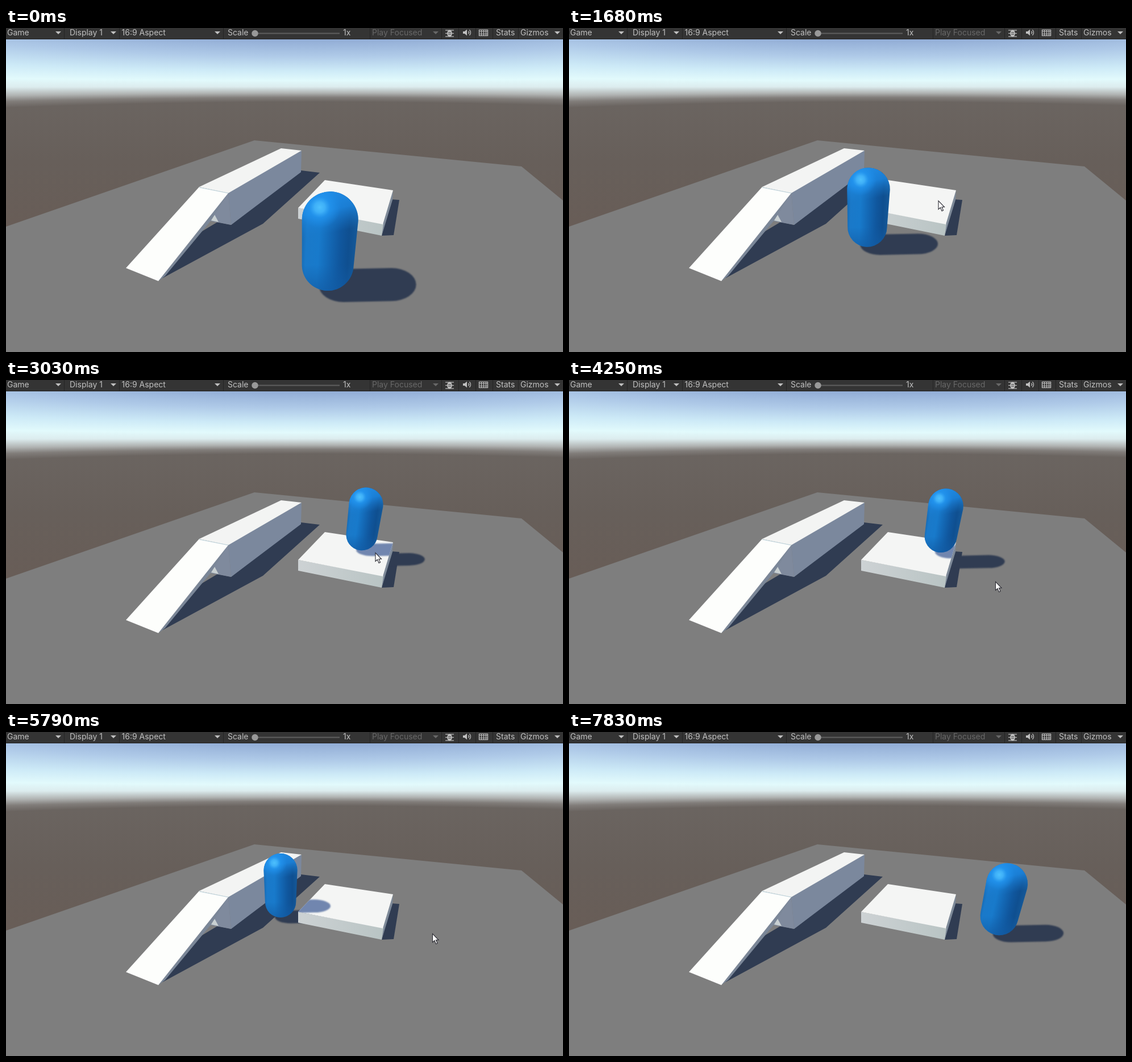
Recreate the animation shown at these times as an HTML page with a canvas. Size 980 by 571 pixels, loop 8330 ms.

```html
<!DOCTYPE html>
<html lang="en">
<head>
<meta charset="utf-8">
<title>Capsule walk</title>
<style>
html, body { margin: 0; width: 100%; height: 100%; overflow: hidden; background: #7e7e7e; }
canvas { display: block; }
</style>
</head>
<body>
<canvas id="stage" width="980" height="571"></canvas>
<script>
const W = 980, H = 571, LOOP = 8330;
const SHADOW = '#303c52';
const stage = document.getElementById('stage').getContext('2d');
let c = stage;

const clamp = (v, lo = 0, hi = 1) => Math.min(hi, Math.max(lo, v));
const smooth = u => u * u * (3 - 2 * u);

// Corners of each walk on the floor: [sideways, depth] in world units
const trips = [
  { from: 1000, to: 3400, path: [[.94, 5.46], [.59, 6.83], [.27, 7.97], [.57, 8.85],
    [1.73, 8.88], [3.02, 8.47]] },
  { from: 4530, to: 7540, path: [[3.02, 8.47], [1.73, 8.88], [.36, 9.12], [-.05, 8.52],
    [-.12, 8.1], [.66, 7.63], [2.52, 7.07], [2.99, 6.92], [4.3, 7.51]] }
];
const RAMP = 440; // ms to reach or lose full speed

// Pointer moves along Bezier curves
const moves = [
  { from: 130, to: 940, curve: [[667, 499], [655, 310], [625, 250], [649.5, 304]] },
  { from: 3400, to: 3970, curve: [[649.5, 304], [605, 450], [720, 490], [743, 369]] },
  { from: 4140, to: 4250, curve: [[743, 369], [743, 369], [750, 355], [750, 355]] },
  { from: 7400, to: 7830, curve: [[750, 355], [748, 370], [738, 500], [738, 524]] }
];

const latest = (list, t) => list.filter(m => m.from <= t).pop() || list[0];
const gapOf = (a, b) => Math.hypot(b[0] - a[0], b[1] - a[1]);
const mix = (a, b, u) => a.map((v, i) => v + (b[i] - v) * u);

function along(path, d) {
  let i = 0;
  while (i < path.length - 2 && d > gapOf(path[i], path[i + 1])) {
    d -= gapOf(path[i], path[i + 1]);
    i++;
  }
  return mix(path[i], path[i + 1], clamp(d / gapOf(path[i], path[i + 1])));
}

// Speeds up, cruises and brakes; corners are rounded
function walkerAt(t) {
  const { from, to, path } = latest(trips, t);
  const total = path.slice(1).reduce((sum, p, i) => sum + gapOf(path[i], p), 0);
  const span = to - from, s = clamp(t - from, 0, span);
  const covered = s < RAMP ? s * s / RAMP / 2 :
    s > span - RAMP ? span - RAMP - (span - s) ** 2 / RAMP / 2 : s - RAMP / 2;
  const d = total * covered / (span - RAMP);
  const round = clamp(Math.min(d, total - d), 0, .25);
  return mix(along(path, d - round), along(path, d + round), .5);
}

function pointerAt(t) {
  const { from, to, curve } = latest(moves, t);
  const u = smooth(clamp((t - from) / (to - from)));
  let points = curve;
  while (points.length > 1)
    points = points.slice(1).map((p, i) => mix(points[i], p, u));
  return points[0];
}

// Screen place of a capsule two units tall, and its height above the floor
function project([side, depth]) {
  const h = 954 / depth, x = 484 + side * h / 2, floor = 79 + h / .455;
  const up = floor < 335 ? smooth(clamp((x - 510) / 45)) : 0;
  return { x, y: floor - .2 * h * up, h, up, lean: .055 * side };
}

function trace(points) {
  c.beginPath();
  for (let i = 0; i < points.length; i += 2) c.lineTo(points[i], points[i + 1]);
  c.closePath();
}

function poly(fill, ...points) {
  trace(points);
  c.fillStyle = fill;
  c.fill();
}

function blend(g, ...stops) {
  for (const [at, color] of stops) g.addColorStop(at, color);
  return g;
}

const linear = (x0, y0, x1, y1, ...stops) =>
  blend(c.createLinearGradient(x0, y0, x1, y1), ...stops);

function line(color, width, ...p) {
  c.beginPath();
  for (let i = 0; i < p.length; i += 4) {
    c.moveTo(p[i], p[i + 1]);
    c.lineTo(p[i + 2], p[i + 3]);
  }
  c.strokeStyle = color;
  c.lineWidth = width;
  c.stroke();
}

function drawBackdrop() {
  c.fillStyle = linear(0, 120, 0, 350, [0, '#6b6561'], [.5, '#675f5a'], [1, '#685d57']);
  c.fillRect(0, 0, W, H);
  // Sky strips: the horizon bends down and the blue thins out to the sides
  for (let x = 0; x < W; x += 4) {
    const bend = ((x - 540) / 540) ** 2, end = 130 + 10 * bend;
    c.fillStyle = linear(0, 20 - 30 * bend, 0, end,
      [0, '#91acd5'], [.27, '#afcae8'], [.5, '#cdeaf7'], [.66, '#e2fafc'],
      [.76, '#dcecee'], [.86, '#b0b3b2'], [.93, '#817d7a'], [1, '#6b6561']);
    c.fillRect(x, 0, 4, end);
  }
  poly('#7e7e7e', 437, 198, 907, 244, 980, 304, 980, 571, 0, 571, 0, 350);
  poly(SHADOW, 396, 347, 519, 251, 552, 255, 452, 345, 275, 441, 342, 360, 372, 342);
  poly(SHADOW, 678, 302, 692, 303, 682, 365, 661, 366);
}

const platformTop = [561, 268, 681, 286, 663, 346, 514, 317];

function drawBlocks() {
  poly('#7f8a9d', 391, 290, 396, 347, 359, 340, 350, 310);
  poly('#c9d0d2', 367, 329, 374, 342, 360, 339);
  poly('#7b889d', 391, 290, 520, 216, 519, 254, 396, 347);
  poly('#f3f4f3', 340, 280, 484, 212, 520, 216, 391, 291);
  poly('#7b8798', 391, 291, 268, 446, 280, 437, 361, 339);
  poly('#fdfefc', 340, 280, 391, 291, 268, 446, 211, 423);
  line('#b9d0da', 1, 340, 281, 391, 291);
  poly('#7d8998', 681, 286, 663, 345, 661, 366, 680, 303);
  poly(linear(514, 0, 663, 0, [0, '#cdd2d4'], [1, '#b9c4c4']),
    514, 317, 664, 345, 661, 366, 514, 336);
  poly('#f4f5f4', ...platformTop);
}

function drawToolbar() {
  const ink = '#c0c0c0', dim = '#686868', bar = '#343434';
  c.fillStyle = bar;
  c.fillRect(0, 0, W, 20);
  c.fillStyle = '#242424';
  c.fillRect(0, 19, W, 1);
  for (const x of [102, 199, 382, 640, 766, 796, 826, 856, 901]) c.fillRect(x, 0, 1, 19);

  c.font = '14px Inter, Roboto, sans-serif';
  const label = (text, x, color = ink) => {
    c.fillStyle = color;
    c.fillText(text, x, 13);
  };
  const caret = (x, color = ink) => poly(color, x - 5, 6, x + 5, 6, x, 11);
  label('Game', 2);
  label('Display 1', 112);
  label('16:9 Aspect', 203.5);
  label('Scale', 390);
  label('1x', 593);
  label('Play Focused', 644, dim);
  label('Stats', 862);
  label('Gizmos', 905);
  for (const x of [92, 189, 372, 970]) caret(x);
  caret(756, dim);

  line('#5e5e5e', 2, 438, 9.5, 587, 9.5);
  c.beginPath();
  c.arc(438, 9.5, 5.7, 0, 7);
  c.fillStyle = '#999';
  c.fill();

  // Bug
  c.beginPath();
  c.ellipse(780.5, 9.5, 4.3, 6, 0, 0, 7);
  c.fillStyle = ink;
  c.fill();
  for (const y of [4, 9.5, 15]) line(ink, 1.2, 773, y, 788, y);
  line(bar, 1, 778, 8, 783, 8, 778, 11, 783, 11);
  // Speaker
  poly(ink, 804, 6, 807, 6, 811, 2.5, 811, 13.5, 807, 10, 804, 10);
  c.strokeStyle = ink;
  c.lineWidth = 1.3;
  for (const r of [3, 6]) {
    c.beginPath();
    c.arc(811.5, 8, r, -.9, .9);
    c.stroke();
  }
  // Keyboard
  c.strokeRect(832.5, 3.5, 15, 10);
  for (const y of [6.5, 10.5]) line(ink, 1, 832, y, 848, y);
  for (const x of [836.5, 840.5, 844.5]) line(ink, 1, x, 3, x, 14);
}

function layer(...draws) {
  const canvas = document.createElement('canvas');
  canvas.width = W;
  canvas.height = H;
  c = canvas.getContext('2d');
  for (const draw of draws) draw();
  c = stage;
  return canvas;
}

// Shadow cast on a surface "drop" capsule heights below the feet scale
function drawShadow({ x, y, h }, drop, fill) {
  const rx = .25 * h, ry = h * (.00107 * h - .02), quarter = Math.PI / 2;
  const left = x + .11 * h * drop;
  const mid = y + .16 * h * drop - h * (.0007 * h - .06);
  c.beginPath();
  c.ellipse(left + .16 * h, mid + .01 * h, rx, ry, 0, quarter, 3 * quarter);
  c.ellipse(left + .64 * h, mid, rx, ry, 0, -quarter, quarter);
  c.closePath();
  c.filter = 'blur(.8px)';
  c.fillStyle = fill;
  c.fill();
  c.filter = 'none';
}

function drawCapsule({ x, y, h, lean }) {
  const top = h * (.232 + .00027 * h + .00009 * Math.max(0, x - 520));
  const low = top * .92, gap = h - top - low, a = Math.atan(lean);
  const tx = x + lean * gap, ty = y - h + top;
  const mx = (x + tx) / 2, my = (y - low + ty) / 2;
  const ex = top * Math.cos(a), ey = top * Math.sin(a);
  const paint = gradient => {
    c.fillStyle = gradient;
    c.fill();
  };
  c.beginPath();
  c.arc(tx, ty, top, Math.PI + a, a);
  c.arc(x, y - low, low, a, Math.PI + a);
  c.closePath();
  paint(linear(mx - ex, my - ey, mx + ex, my + ey, [0, '#1768af'], [.1, '#1a79c9'],
    [.32, '#187acb'], [.5, '#1469b6'], [.7, '#10579e'], [.85, '#0f4f90'], [1, '#155999']));
  paint(linear(tx - top * .15, ty - top, tx + top * .15, ty + top * .45,
    [0, 'rgba(32,140,230,.95)'], [.45, 'rgba(30,140,232,.75)'], [1, 'rgba(26,125,210,0)']));
  paint(linear(0, y - low, 0, y, [0, 'rgba(18,92,165,0)'], [1, 'rgba(18,92,165,.7)']));
  const gx = tx - top * .37, gy = ty - top * .44;
  paint(blend(c.createRadialGradient(gx, gy, 0, gx, gy, top * .75), [0, '#4dc0fd'],
    [.25, 'rgba(66,180,250,.9)'], [.5, 'rgba(36,152,242,.6)'], [1, 'rgba(30,145,238,0)']));
}

function drawPointer([x, y]) {
  c.save();
  c.translate(x + .5, y + .5);
  poly('#fff', 0, 0, 0, 15, 3.5, 12, 6, 18, 8.5, 17, 6, 11, 10.5, 11);
  c.strokeStyle = '#2b2b33';
  c.lineWidth = 1.1;
  c.stroke();
  c.restore();
}

const backdrop = layer(drawBackdrop);
const scenery = layer(drawBlocks, drawToolbar);

function render(t) {
  const capsule = project(walkerAt(t));
  c.drawImage(backdrop, 0, 0);
  drawShadow(capsule, capsule.up, SHADOW);
  c.drawImage(scenery, 0, 0);
  c.save();
  trace(platformTop);
  c.clip();
  drawShadow(capsule, capsule.up - 1, '#7186af');
  c.restore();
  drawCapsule(capsule);
  if (t >= 130 && t < 7830) drawPointer(pointerAt(t));
}

const start = performance.now();
function tick() {
  render((performance.now() - start) % LOOP);
  requestAnimationFrame(tick);
}
tick();
</script>
</body>
</html>
```
